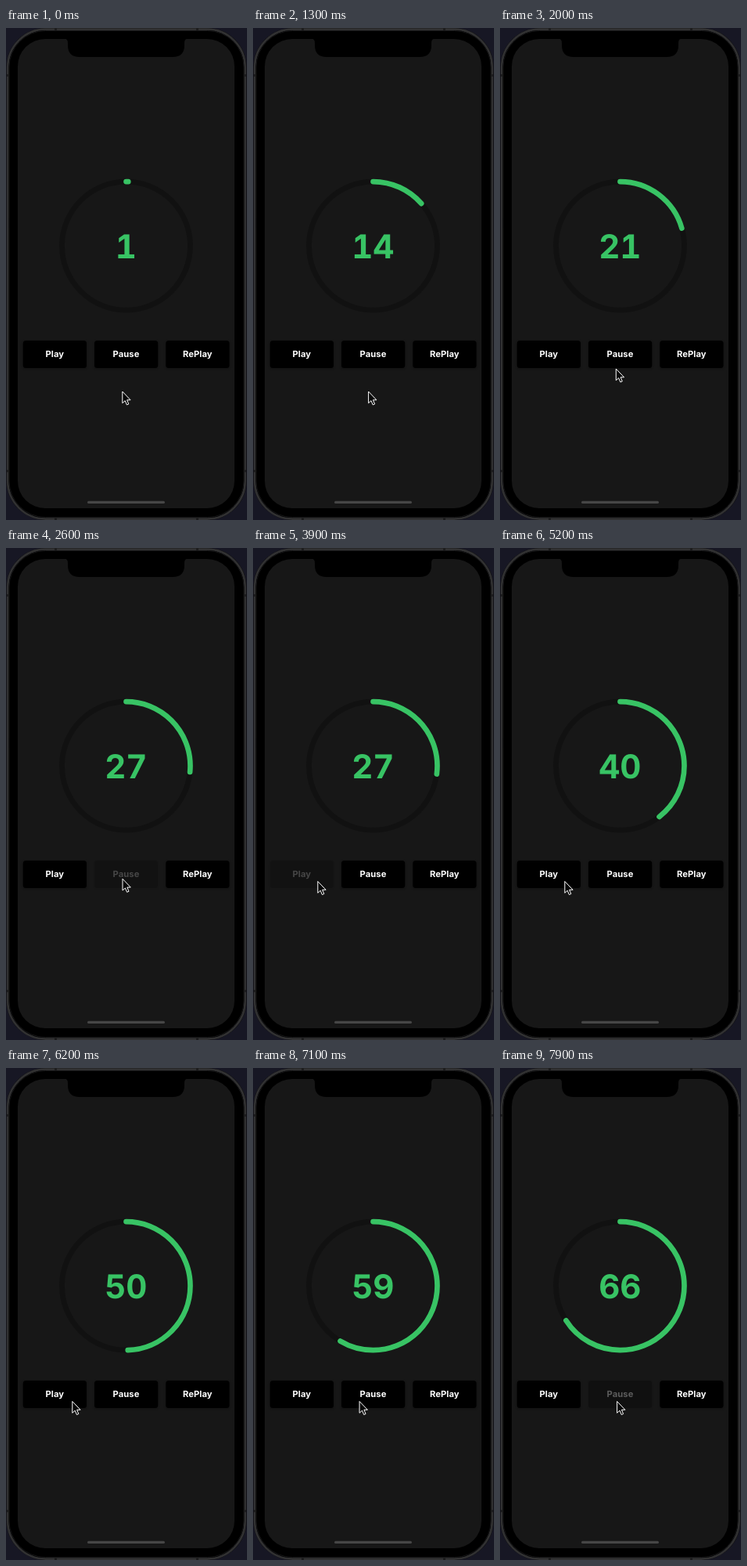
An HTML page that plays this animation: 308 by 628 pixels, repeating every 8000 ms.

```html
<!DOCTYPE html>
<html lang="en">
<head>
<meta charset="utf-8">
<title>Circular progress</title>
<style>
  html, body { margin: 0; width: 100%; height: 100%; overflow: hidden; background: #171724; }
  svg { display: block; width: 308px; height: 628px; font-family: Inter, sans-serif; text-anchor: middle; text-rendering: geometricPrecision; }
  #count { font-size: 42px; font-weight: 650; font-variant-numeric: tabular-nums; fill: #38c364; }
  .btn rect { filter: drop-shadow(0 1px 1.5px #0005); }
  .btn text { font-size: 11.2px; font-weight: 650; letter-spacing: .1px; fill: #fff; }
</style>
</head>
<body>
<svg viewBox="0 0 308 628">
  <rect width="308" height="628" fill="#171724"/>
  <!-- phone body -->
  <rect x=".5" y="0" width="307" height="628" rx="50" fill="#101011"/>
  <rect x="2.2" y="1.6" width="303.4" height="625" rx="48.5" fill="#000" stroke="#313132" stroke-width="2.6"/>
  <rect x="4" y="3.5" width="300" height="621" rx="46.5" fill="#000" stroke="#161617"/>
  <path d="M62 1.6h3M243 1.6h3M62 626.6h3M243 626.6h3M2.2 59v3M2.2 564v3M305.6 59v3M305.6 564v3" stroke="#1c1c1d" stroke-width="2.6"/>
  <!-- screen -->
  <rect x="15" y="14" width="277" height="599" rx="35" fill="#171717"/>
  <path d="M75 13.5Q79 14 79 19V22Q79 37 94 37H213Q228 37 228 22V19Q228 14 232 13.5Z"/>
  <rect x="104" y="603.8" width="99" height="3.3" rx="1.65" fill="#464646"/>
  <!-- dial -->
  <g fill="none" stroke-width="6.7" transform="rotate(-90 153.5 278.1)">
    <circle cx="153.5" cy="278.1" r="82" stroke="#111"/>
    <circle id="arc" cx="153.5" cy="278.1" r="82" stroke="#38c364" stroke-linecap="round" pathLength="100"/>
  </g>
  <text id="count" x="153.3" y="293.5"></text>
  <g id="buttons"></g>
  <path id="cursor" d="M0 0V14.8L3.4 11.7L5.6 17L8 16L5.8 10.8H10.3Z" fill="#080808" stroke="#fff" stroke-linejoin="round"/>
</svg>
<script>
const LOOP = 8000, STEP = 100, FADE = 250, DIM = 0.2;
const $ = id => document.getElementById(id);

// press and release times of each button
const buttons = [
  { label: 'Play', x: 21.8, taps: [[3850, 3950]] },
  { label: 'Pause', x: 113, taps: [[2560, 2650], [7740, 7840]] },
  { label: 'RePlay', x: 204.3, taps: [] }
];

// spans during which the counter runs, one percent per 100 ms
const runs = [[0, 2650], [3950, 7840]];

// time, x, y of the pointer tip
const path = [
  [0, 148.8, 464], [900, 147.6, 464], [1500, 147.6, 464], [1800, 147.8, 443.5],
  [2300, 149, 422.3], [3300, 149, 422.3], [3700, 82.8, 425.5], [5800, 82.8, 425.5],
  [6100, 84.8, 425.5], [6400, 84.8, 425.5], [6500, 95.5, 425.5],
  [7300, 149.6, 425.5], [LOOP, 149.6, 425.5]
];

for (const b of buttons) {
  $('buttons').insertAdjacentHTML('beforeend',
    `<g class="btn"><rect x="${b.x}" y="399" width="81.2" height="35" rx="3.5"/>
     <text x="${b.x + 40.5}" y="420.4">${b.label}</text></g>`);
  b.el = $('buttons').lastElementChild;
}

const easeInOut = k => k < 0.5 ? 2 * k * k : 1 - 2 * (1 - k) * (1 - k);

function opacityAt(taps, t) {
  const tap = taps.find(([down, up]) => t >= down && t < up + FADE);
  if (!tap) return 1;
  return DIM + (1 - DIM) * easeInOut(Math.max(0, t - tap[1]) / FADE);
}

function progressAt(t) {
  return runs.reduce((sum, [from, to]) =>
    sum + Math.max(0, Math.min(t, to) - from) / 100, 0.55);
}

function pointerAt(t) {
  const i = path.findIndex(p => p[0] > t);
  const [t0, x0, y0] = path[i - 1], [t1, x1, y1] = path[i];
  const k = (t - t0) / (t1 - t0);
  return [x0 + (x1 - x0) * k, y0 + (y1 - y0) * k];
}

function draw(t) {
  const p = progressAt(t);
  $('arc').setAttribute('stroke-dasharray', `${p} 200`);
  $('count').textContent = Math.round(p);
  for (const b of buttons) b.el.setAttribute('opacity', opacityAt(b.taps, t));
  $('cursor').setAttribute('transform', `translate(${pointerAt(t)})`);
}

const start = performance.now();
function tick() {
  const t = (performance.now() - start) % LOOP;
  draw(Math.floor(t / STEP) * STEP);
  requestAnimationFrame(tick);
}
tick();
</script>
</body>
</html>
```
